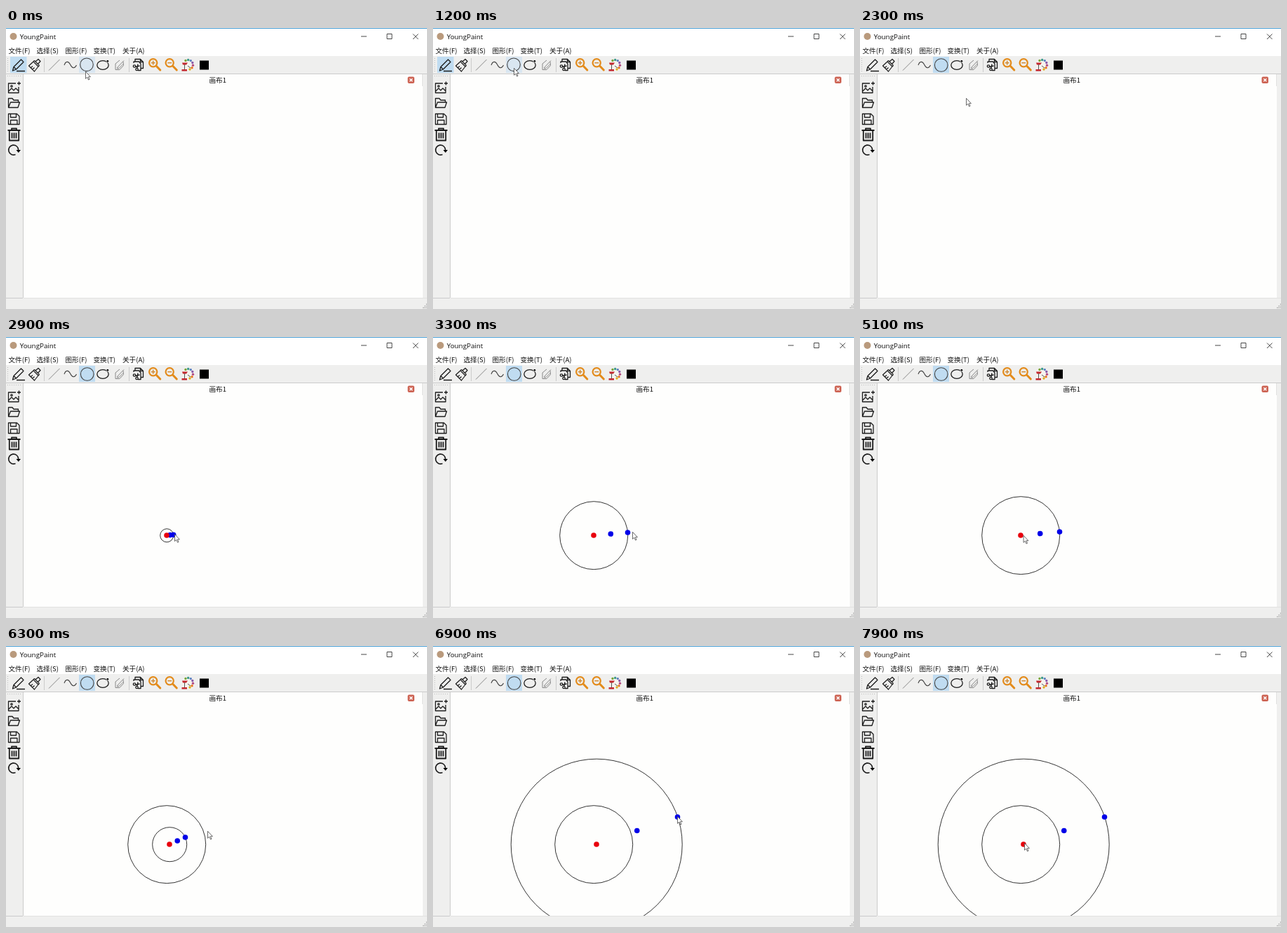
An HTML page for the animation above (8 s loop, 600 by 401 pixels).

```html
<!DOCTYPE html>
<html lang="zh">
<head>
<meta charset="utf-8">
<style>
  html, body { margin: 0; width: 100%; height: 100%; overflow: hidden; background: #efefee; }
  svg { display: block; width: 600px; height: 401px; }
  text { font: 9.6px "Noto Sans CJK SC", "Noto Sans CJK", "Open Sans", sans-serif; fill: #111; }
  .title { font: 9.8px "Open Sans", "Noto Sans", sans-serif; }
  .ink { fill: none; stroke: #1c1c1c; stroke-width: 1.3; stroke-linejoin: round; }
  .thin { fill: none; stroke: #444; stroke-width: 1.1; }
  .pale { fill: none; stroke: #888; }
  .zoom { fill: none; stroke: #e38b1b; stroke-width: 2.2; }
  .sign { fill: none; stroke: #d08a35; stroke-width: 1.5; }
  .rule { fill: none; stroke: #cbcbcb; }
  .dots { stroke: #bbb; stroke-dasharray: 1 2; }
  .shape { fill: none; stroke: #000; stroke-width: .8; }
</style>
</head>
<body>
<svg viewBox="0 0 600 401">
  <defs><clipPath id="page"><path d="M25 83H594V385H25z"/></clipPath></defs>

  <!-- window frame and menu -->
  <path fill="#efefee" d="M0 0H600V401H0z"/>
  <path fill="#fff" d="M0 0H600V40H0z"/>
  <path fill="#4a9fd6" d="M0 0H600V1H0z"/>
  <circle cx="10.500" cy="12" r="5" fill="#b99a7d"/>
  <text class="title" x="19.700" y="15.800">YoungPaint</text>
  <path fill="none" stroke="#333" stroke-width=".9" d="M506 12h8M543 8.500h7v7h-7zM580 8.500l7.500 7.500M587.500 8.500l-7.500 7.500"/>
  <g id="menu"></g>

  <!-- panes -->
  <path fill="#fefefd" d="M25 66H594V385H25z"/>
  <path class="rule" d="M0 65.500H600M24.500 66V385M0 385.500H24"/>
  <path fill="none" stroke="#e2e2e1" d="M25 385.500H600M593.500 66V83"/>
  <path class="dots" d="M2.500 43V63M2 68.500H22"/>
  <path class="rule" d="M54.500 43V63M175.500 43V63"/>
  <path fill="none" stroke="#aaa" stroke-width="1.500" stroke-dasharray="1.500 1" d="M594 399.200h6M596.500 396.700h4M598.800 394.200h2"/>
  <text x="289.500" y="78">画布1</text>
  <rect x="572.500" y="69.500" width="9.500" height="9.500" rx="2" fill="#cd6353"/>
  <path stroke="#fff" stroke-width="1.400" d="M575.300 72.300l4 4M579.300 72.300l-4 4"/>

  <!-- drawing tools -->
  <rect id="penBox" x="6" y="41" width="23.500" height="23" fill="#c0dcf1"/>
  <rect id="ringBox" x="104" y="41" width="23" height="23"/>
  <g class="ink">
    <path d="M9.500 61l1.500-5.500 10.500-10.500 3.500 3.500-10.500 10.500zM11 55.500l3.500 3.500M15 61.500H27"/>
    <path stroke-width="1.200" d="M42 48l4-3.500 3 3-3.500 4M40.500 46.500l7 7M39 48l7 7M40.500 46.500l-1.500 1.500-6.500 6 8 8 5.500-7 1.500-1.500M35 57l3-2.500M37.500 59.500l3-3"/>
    <ellipse cx="138" cy="53" rx="8.200" ry="6.300"/>
  </g>
  <circle cx="145" cy="47.300" r="2.300" fill="#efefee"/>
  <circle cx="144.800" cy="47.300" r="1.400"/>
  <path class="pale" d="M61 60.500L76.500 45"/>
  <path class="thin" d="M83 53c2-6 6-6 8.500-1s6 7 9 1"/>
  <circle id="ring" class="thin" r="9.300"/>
  <path class="pale" d="M156 51l6-5M167 48l.5 5.500-5.500 6-6 0V51M159 56l7-7.500 2-2M159 56l-.5 2 2.500-.5 6-6"/>

  <!-- clipboard with scissors -->
  <g class="ink">
    <path d="M184 48v-3.500h7.500l4 4v9h-3M191.500 44.500v4h4M182 50v-2h7.500l2.500 3v9.500h-4"/>
    <circle cx="183" cy="54.500" r="1.700"/><circle cx="186.500" cy="59" r="1.700"/>
    <path d="M184.500 55.500l6-1.500M186.800 57.500l1.200-6"/>
  </g>

  <g id="lens">
    <circle class="zoom" cx="209.700" cy="49.700" r="5.600"/>
    <path class="zoom" style="stroke-width:3px" stroke-linecap="round" d="M214.500 54.500l5.300 5.500"/>
    <path class="sign" d="M206.800 49.700h5.800"/>
  </g>
  <use href="#lens" x="23.500"/>
  <path class="sign" d="M209.700 46.800v5.800"/>

  <!-- palette -->
  <ellipse cx="259.500" cy="53" rx="8.800" ry="8.800" fill="#f6f3ee"/>
  <g id="paints"></g>
  <path fill="#c3272e" d="M251 49.500h8l-2 3h-5zM250.500 59h7.500v2.500h-7.500z"/>
  <path fill="none" stroke="#555" d="M254.500 52v7M259 54l4 3"/>
  <path d="M276 46.500h13v13h-13z"/>

  <!-- file tools -->
  <g class="ink">
    <path d="M14 79H3.500V92.500H18V84M16 79h5M18.500 76.500v5M4 90l4-4 3 3 3-3 4 4"/>
    <circle cx="8" cy="83" r="1.200"/>
    <path d="M3.500 113.500V100.500h5.500l2 2.500h6.500v3M3.500 113.500l3-7.500h13l-2.500 7.500z"/>
    <path d="M3.500 122.500H15.500l3.500 3.500V137.500H3.500zM6.500 122.500v5h8v-5M6.500 137v-5.500h9.500v5.500"/>
    <path stroke-width="1.800" d="M2.500 146H20.500M8 146v-2.500h7v2.500M4.800 146V160.500H18.200V146M8.500 149.500v8M11.500 149.500v8M14.500 149.500v8"/>
    <path stroke-width="1.600" d="M13.500 180.500A7 7 0 1 1 17.700 174"/>
  </g>
  <path d="M14.500 174h6.500l-3.200 4z"/>

  <g id="art" clip-path="url(#page)"></g>
  <path id="cursor" fill="#fff" stroke="#444" stroke-width=".8" stroke-linejoin="round"
        d="M.5 .3V10.300L2.800 8.200 4.500 12 6 11.300 4.400 7.700H7.400z"/>
</svg>
<script>
const $ = id => document.getElementById(id);
const LOOP = 8000, STEP = 100, PICK = 1500;

$('menu').innerHTML = [['文件(F)', 3.5], ['选择(S)', 43.5], ['图形(F)', 84.5], ['变换(T)', 124.5], ['关于(A)', 166]]
  .map(([s, x]) => `<text x="${x}" y="36">${s}</text>`).join('');

$('paints').innerHTML = ['#7aa63c', '#3b9a8c', '#5a7fc0', '#8a5aa8', '#b04b83', '#e8731f', '#d9b020']
  .map((c, i) => {
    const a = -2.1 + i * 0.55;
    return `<circle cx="${259.5 + 7 * Math.cos(a)}" cy="${52.5 + 7 * Math.sin(a)}" r="1.7" fill="${c}"/>`;
  }).join('');

// Keys are [time, x, y]
const pointer = [
  [0, 113, 62], [600, 113, 62], [1100, 115, 57], [1600, 115, 57], [1800, 119, 72],
  [2300, 151, 100], [2700, 228, 282], [2800, 229, 282], [3300, 284, 278], [3500, 284.5, 277],
  [4600, 285, 277], [5000, 232.5, 283], [5800, 233, 283], [6300, 287, 264], [6700, 348, 243],
  [6900, 348, 243], [7200, 250, 278], [7500, 234, 281]
];
const drags = [
  [[2800, 229, 283], [3300, 277.5, 279], [3500, 284.5, 278]],
  [[5900, 233, 283], [6300, 255.5, 273], [6800, 348.5, 244]]
];

function at(keys, t) {
  const i = keys.findIndex(k => k[0] > t);
  if (i < 0) return keys[keys.length - 1].slice(1);
  const [t0, x0, y0] = keys[i - 1], [t1, x1, y1] = keys[i];
  const p = (t - t0) / (t1 - t0);
  return [x0 + (x1 - x0) * p, y0 + (y1 - y0) * p];
}

const dot = (x, y, color) => `<circle cx="${x}" cy="${y}" r="3.8" fill="${color}"/>`;

function drawCircle(keys, t, active) {
  const [, cx, cy] = keys[0], [x, y] = at(keys, t);
  const r = Math.round(2 * Math.hypot(x - cx, y - cy)) / 2;
  const ring = `<circle class="shape" cx="${cx + 0.2}" cy="${cy + 0.2}" r="${r}"/>`;
  if (!active) return ring;
  return ring + dot(x, y, '#0000e8') + dot((x + cx) / 2, (y + cy) / 2, '#0000e8') + dot(cx, cy, '#e8000c');
}

function draw(t) {
  const picked = t >= PICK;
  $('penBox').style.display = picked ? 'none' : '';
  $('ringBox').setAttribute('fill', picked ? '#c0dcf1' : '#d9e6f1');
  $('ring').setAttribute('transform', picked ? 'translate(115.7 53)' : 'translate(115 52.3)');
  const begun = drags.filter(d => t >= d[0][0]);
  $('art').innerHTML = begun.map((d, i) => drawCircle(d, t, i === begun.length - 1)).join('');
  $('cursor').setAttribute('transform', `translate(${at(pointer, t)})`);
}

const start = performance.now();
function tick() {
  const t = (performance.now() - start) % LOOP;
  draw(Math.floor(t / STEP) * STEP);
  requestAnimationFrame(tick);
}
tick();
</script>
</body>
</html>
```
